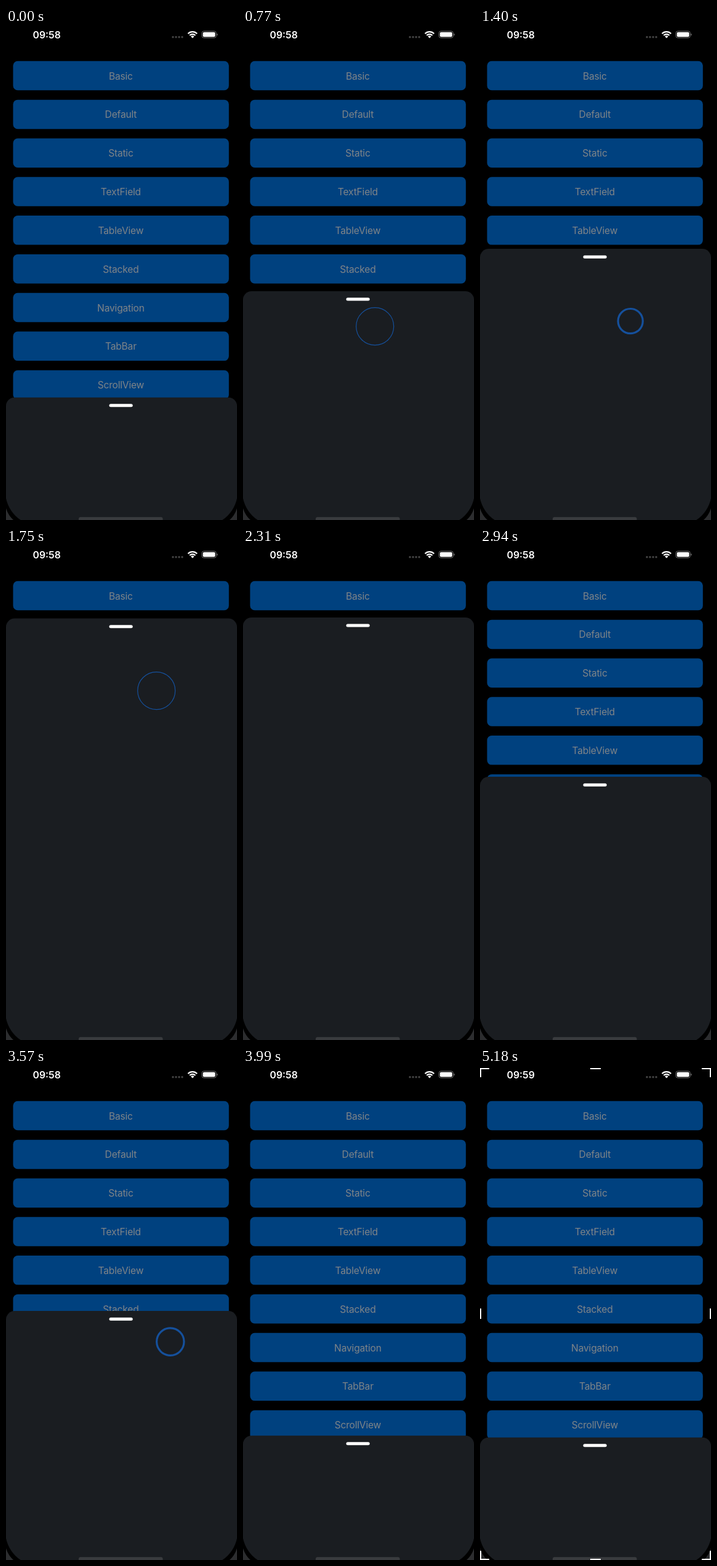
Write an HTML page that moves like this. It is 375 px wide and 800 px high and loops after 5250 ms.

```html
<!DOCTYPE html>
<html lang="en">
<head>
<meta charset="utf-8">
<title>Bottom sheet</title>
<style>
  html, body { margin: 0; width: 100%; height: 100%; overflow: hidden; background: #000; }
  svg { display: block; width: 375px; height: 800px; }
  text { font-family: Inter, "Liberation Sans", sans-serif; }
  .label { font-size: 15.6px; letter-spacing: -0.2px; fill: #7f8488; text-anchor: middle; }
  .clock { font-size: 15.8px; font-weight: 600; fill: #fff; }
</style>
</head>
<body>
<svg viewBox="0 0 375 800">
  <defs>
    <clipPath id="screen"><rect x="-1" y="-60" width="377" height="869" rx="55"/></clipPath>
  </defs>
  <rect width="375" height="800"/>
  <path d="M0 781Q4 793 12 800H0ZM375 781Q371 793 363 800H375Z" fill="#2c2d2f"/>
  <g id="buttons"></g>

  <text id="clock" class="clock" x="43.5" y="16.5">09:58</text>
  <path d="M271 14.7H287" stroke="#454545" stroke-width="3.4" stroke-linecap="round" stroke-dasharray="0 5"/>
  <g id="wifi" fill="none" stroke="#fff" stroke-width="2.3"></g>
  <rect x="317.9" y="5.1" width="23.4" height="11" rx="3.4" fill="none" stroke="#6c6c6c"/>
  <rect x="319.6" y="6.8" width="20" height="7.6" rx="2" fill="#fff"/>
  <path d="M342.3 8.8q1.5 .5 1.5 1.9t-1.5 1.9z" fill="#6c6c6c"/>

  <g clip-path="url(#screen)">
    <g id="sheet">
      <rect width="375" height="850" rx="14" fill="#1a1d21"/>
      <rect x="167.5" y="10.6" width="38.2" height="5" rx="2.5" fill="#fff"/>
    </g>
  </g>
  <rect x="118" y="795.3" width="136.5" height="8" rx="3" fill="#393b3e"/>
  <circle id="ring" fill="none" stroke="#15509c"/>
  <path id="marks" fill="none" stroke="#fff" stroke-width="4"
    d="M0 15V0H15M360 0H375V15M375 785V800H360M15 800H0V785M179 0H196M179 800H196M0 391V408M375 391V408"/>
</svg>
<script>
const LOOP = 5250, STEP = 70, TAP = 350;
const LOW = 600.7, MID = 392, HIGH = 113;
const $ = id => document.getElementById(id);

$('buttons').innerHTML = ['Basic', 'Default', 'Static', 'TextField', 'TableView',
  'Stacked', 'Navigation', 'TabBar', 'ScrollView'].map((name, i) => {
  const y = 53.8 + 62.83 * i;
  return `<rect x="11.5" y="${y}" width="350.3" height="47.5" rx="7.5" fill="#00417f"/>
    <text class="label" x="186.4" y="${y + 29.8}">${name}</text>`;
}).join('');

const arc = r => {
  const d = r * Math.SQRT1_2;
  return `M${302.8 - d} ${16.6 - d}A${r} ${r} 0 0 1 ${302.8 + d} ${16.6 - d}`;
};
$('wifi').innerHTML = `<path d="${arc(10.4)}"/><path d="${arc(6.5)}"/>
  <path d="${arc(3.9)}L302.8 16.6Z" fill="#fff" stroke="none"/>`;

// a higher snap makes the sheet arrive earlier and settle longer
const moves = [
  { at: 420, end: 1190, to: MID, snap: 7.6 },
  { at: 1330, end: 2170, to: HIGH, snap: 18 },
  { at: 2310, end: 3290, to: MID, snap: 4.95 },
  { at: 3540, end: 4270, to: LOW, snap: 8.9 }
];

// dy is the distance below the sheet's top edge
const taps = [
  { at: 420, x: 214.2, dy: 57.2 },
  { at: 1400, x: 244.2, dy: 117.5 },
  { at: 2520, x: 279, dy: 118.8 },
  { at: 3500, x: 266.8, dy: 50 }
];

const ease = (p, snap) => 1 - (1 - p * p) ** snap;

function topAt(t) {
  let y = LOW;
  for (const { at, end, to, snap } of moves) {
    const p = Math.min(1, Math.max(0, (t - at) / (end - at)));
    y += (to - y) * ease(p, snap);
  }
  return y;
}

function set(el, attrs) {
  for (const k in attrs) el.setAttribute(k, attrs[k]);
}

function draw(t) {
  const top = topAt(t);
  set($('sheet'), { transform: `translate(0 ${top})` });

  const tap = taps.find(a => t >= a.at && t <= a.at + TAP);
  $('ring').style.display = tap ? '' : 'none';
  if (tap) {
    const p = (t - tap.at) / TAP;
    set($('ring'), {
      cx: tap.x, cy: top + tap.dy, r: 20.1 + 10.4 * p,
      'stroke-width': 3.2 - 2 * p ** 3
    });
  }

  $('marks').style.display = t >= 4480 ? '' : 'none';
  $('clock').textContent = t >= 5110 ? '09:59' : '09:58';
}

const start = performance.now();
function tick() {
  const t = (performance.now() - start) % LOOP;
  draw(Math.floor(t / STEP) * STEP);
  requestAnimationFrame(tick);
}
tick();
</script>
</body>
</html>
```
